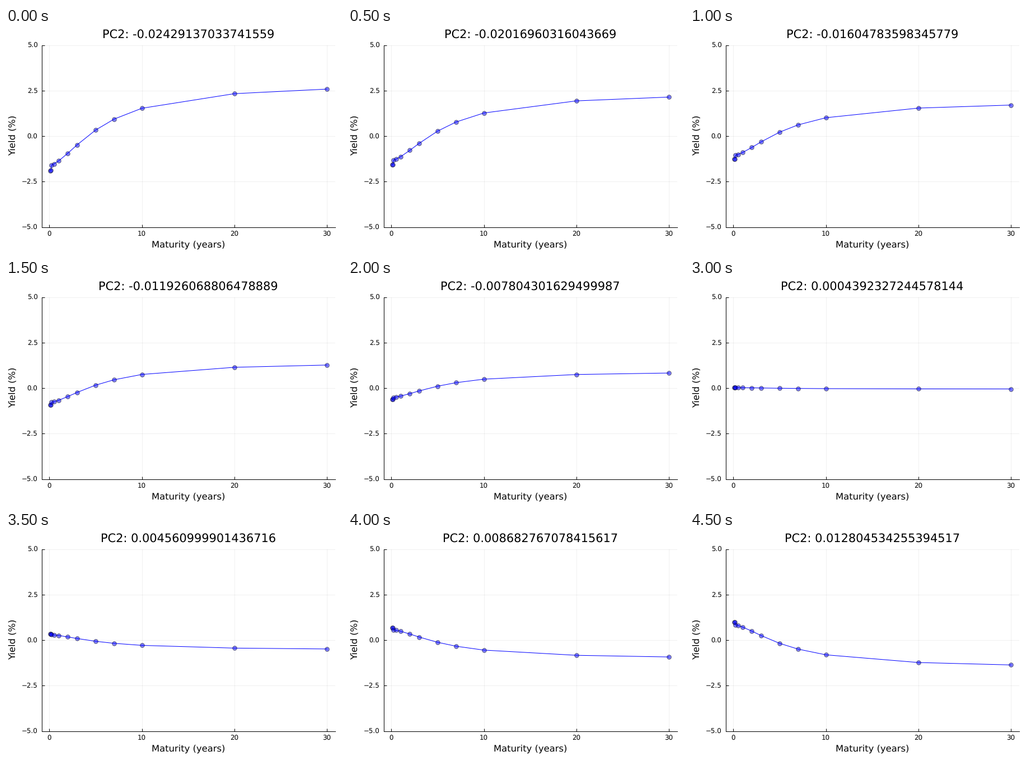
A matplotlib script that plays this animation: 600x400 px, repeating every 5 s.

```python
import matplotlib.pyplot as plt
import numpy as np
from matplotlib.animation import FuncAnimation

W, H, DPI = 600, 400, 100
PT = 72 / DPI  # points per pixel
LEFT, RIGHT, TOP, BOTTOM = 63.9, 588.0, 30.6, 355.6
CENTER = (LEFT + RIGHT) / 2
TICK, LABEL, TITLE = (1.487 * pt for pt in (8, 11, 14))

FRAMES = 10
FIRST, LAST = -0.02429137033741559, 0.012804534255394517

plt.rcParams.update({"font.family": "DejaVu Sans", "text.hinting": "none"})

maturity = np.r_[np.array([1, 2, 3, 6]) / 12, 1, 2, 3, 5, 7, 10, 20, 30]


def first_curve(m):
    """Yield at the first score: an S-shape in log maturity, lower for the shortest bills."""
    growth = (m / 5.95) ** 1.6
    return -1.61 + 4.51 * growth / (1 + growth) - 0.29 * (m < 0.2)


# Extended precision keeps the printed digits correctly rounded.
scores = np.linspace(np.longdouble(FIRST), np.longdouble(LAST), FRAMES,
                     dtype=np.longdouble).astype(float)

fig = plt.figure(figsize=(W / DPI, H / DPI), dpi=DPI, facecolor="white")
ax = fig.add_axes([LEFT / W, 1 - BOTTOM / H, (RIGHT - LEFT) / W, (BOTTOM - TOP) / H])


def label(x, y, text, size, ha="center", **kw):
    """Place text with its baseline at pixel (x, y), size in pixels."""
    return fig.text(x / W, 1 - y / H, text, fontsize=size * PT,
                    ha=ha, va="baseline", **kw)


pad = 0.03 * np.ptp(maturity)
ax.set_xlim(maturity[0] - pad, maturity[-1] + pad)
ax.set_ylim(-5, 5)
ax.set_xticks(np.arange(0, 31, 10))
ax.set_yticks(np.arange(-5, 5.1, 2.5))
ax.tick_params(direction="in", length=5 * PT, width=PT,
               labelbottom=False, labelleft=False)
ax.grid(color="black", alpha=0.06, linewidth=PT)
ax.set_axisbelow(True)
for side in ("top", "right"):
    ax.spines[side].set_visible(False)
for side in ("left", "bottom"):
    ax.spines[side].set_linewidth(PT)

for x in ax.get_xticks():
    px = LEFT + (x - ax.get_xlim()[0]) / np.ptp(ax.get_xlim()) * (RIGHT - LEFT)
    label(px - 0.3, 371.6, f"{x:.0f}", TICK)
for y in ax.get_yticks():
    py = BOTTOM - (y + 5) / 10 * (BOTTOM - TOP)
    label(56.6, py + 4.5, f"{y:.1f}".replace("-", "\u2212"), TICK, ha="right")

title = label(CENTER - 0.4, 18.1, "", TITLE)
label(CENTER - 0.3, 392, "Maturity (years)", LABEL)
label(16.8, 191.8, "Yield (%)", LABEL, rotation=90, rotation_mode="anchor")

line, = ax.plot([], [], color="blue", linewidth=PT)
dots, = ax.plot([], [], "o", markersize=7.6 * PT, markeredgewidth=PT,
                markerfacecolor=(0, 0, 1, 0.5), markeredgecolor=(0, 0, 0, 0.5),
                clip_on=False, snap=False)


def update(i):
    score = float(scores[i])
    rates = first_curve(maturity) * score / FIRST
    line.set_data(maturity, rates)
    dots.set_data(maturity, rates)
    title.set_text(f"PC2: {score}")
    return line, dots, title


anim = FuncAnimation(fig, update, frames=FRAMES, interval=500,
                     init_func=lambda: update(0), repeat=True, repeat_delay=0)
plt.show()
```
